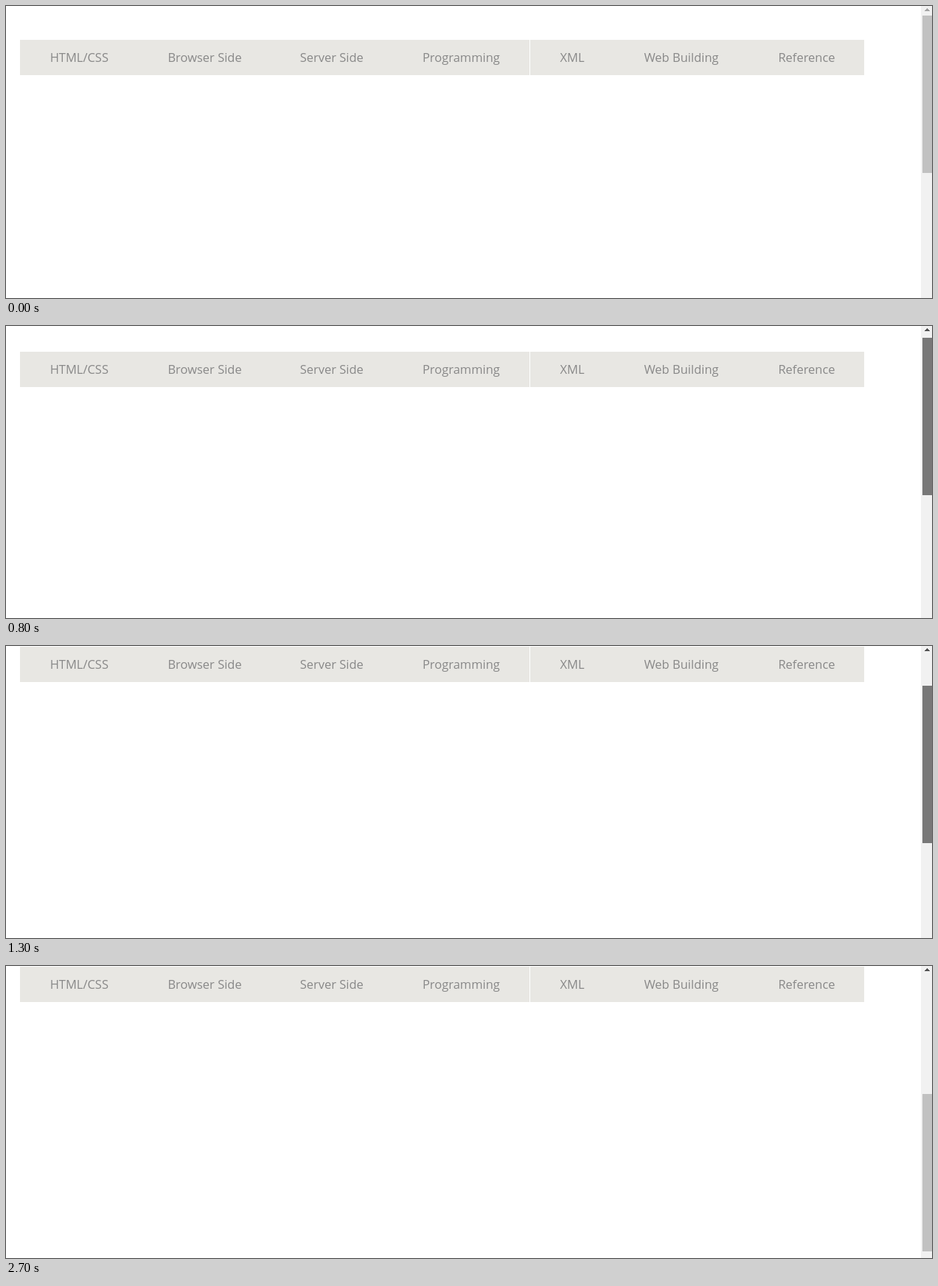
Animation of 1256x397 px, one loop 3700 ms. Source, as an HTML page:

```html
<!DOCTYPE html>
<html lang="en">
<head>
<meta charset="utf-8">
<title>Sticky menu</title>
<style>
  html, body { margin: 0; width: 100%; height: 100%; overflow: hidden; background: #fff; }
  svg { display: block; width: 1256px; height: 397px; }
  text { font: 16.5px "Open Sans", "Noto Sans", sans-serif; fill: #888; text-anchor: middle; }
</style>
</head>
<body>
<svg viewBox="0 0 1256 397" xmlns="http://www.w3.org/2000/svg">
  <rect width="1256" height="397" fill="#fff"/>
  <g id="menu">
    <rect x="19" width="1145" height="48" fill="#e8e7e3"/>
    <rect x="710" width="1" height="48" fill="#fff"/>
  </g>
  <rect x="1241" width="15" height="397" fill="#f1f1f1"/>
  <path id="arrow" d="M1246 7h7v-1h-1v-1h-1v-1h-1v-1h-1v1h-1v1h-1v1h-1z"/>
  <rect id="thumb" x="1243" width="13" height="214"/>
</svg>
<script>
const LOOP = 3700, STEP = 100;
const TOP = 13, MENU_TOP = 46, STUCK = 1;
const SCROLL_RATIO = 25 / 7; // page pixels per thumb pixel

const menu = document.getElementById("menu");
const arrow = document.getElementById("arrow");
const thumb = document.getElementById("thumb");

const labels = [
  ["HTML/CSS", 99.3], ["Browser Side", 269.6], ["Server Side", 441.8],
  ["Programming", 617.4], ["XML", 768], ["Web Building", 916], ["Reference", 1086]
];
for (const [name, x] of labels) {
  const label = document.createElementNS("http://www.w3.org/2000/svg", "text");
  label.setAttribute("x", x);
  label.setAttribute("y", 30);
  label.textContent = name;
  menu.append(label);
}

// [time, thumb top]
const drag = [
  [700, 13], [800, 16], [900, 20], [1200, 46], [1300, 54], [1400, 54],
  [1500, 65], [1800, 122], [2000, 150], [2200, 174]
];

function thumbTop(t) {
  if (t <= drag[0][0]) return TOP;
  for (let i = 1; i < drag.length; i++) {
    const [t0, y0] = drag[i - 1], [t1, y1] = drag[i];
    if (t <= t1) return Math.round(y0 + (y1 - y0) * (t - t0) / (t1 - t0));
  }
  return drag[drag.length - 1][1];
}

function thumbColor(t) {
  if (t < 200 || t >= 2700) return "#c1c1c1";
  return t < 700 || t >= 2500 ? "#a8a8a8" : "#787878";
}

function draw(ms) {
  const t = Math.floor(ms % LOOP / STEP) * STEP;
  const y = thumbTop(t);
  const menuY = Math.max(STUCK, MENU_TOP - Math.round((y - TOP) * SCROLL_RATIO));
  menu.setAttribute("transform", `translate(0 ${menuY})`);
  thumb.setAttribute("y", y);
  thumb.setAttribute("fill", thumbColor(t));
  arrow.setAttribute("fill", y > TOP ? "#505050" : "#a3a3a3");
}

const start = performance.now();
function tick() {
  draw(performance.now() - start);
  requestAnimationFrame(tick);
}
tick();
</script>
</body>
</html>
```
